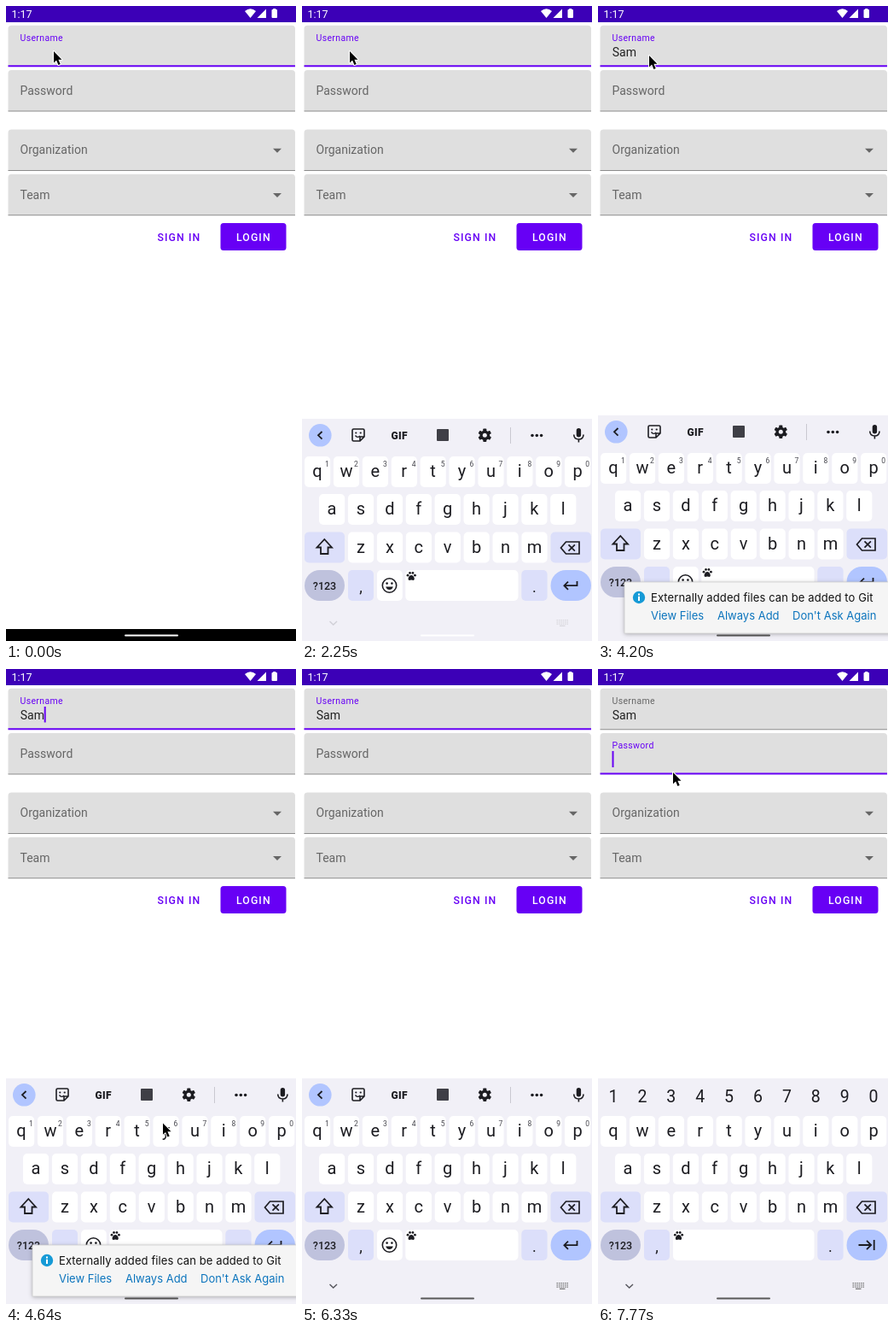
Animation, 340 px wide and 743 px high, one loop 8 s. Source, as an HTML page with a canvas:

```html
<!DOCTYPE html>
<html lang="en">
<head>
<meta charset="utf-8">
<style>
html, body { margin: 0; width: 340px; height: 743px; overflow: hidden; background: #fff; }
canvas { display: block; }
</style>
</head>
<body>
<canvas id="stage" width="340" height="743"></canvas>
<script>
const ctx = document.getElementById('stage').getContext('2d');
const LOOP = 8000;
const ACCENT = '#6700f5', GREY = '#666', INK = '#1c1c21', LINK = '#0b74bd';
const USER = 'Sam';
const LINKS = [['View Files', 62], ['Always Add', 140], ["Don't Ask Again", 228]];

// Times at which each part starts and stops being visible
const CARET_ON = [[480, 990], [1500, 1800], [2600, 3110], [3310, 3820], [4290, 4800],
  [5310, 5820], [6350, 6830], [7340, 7620], [7720, 8000]];
const MOUSE = [[0, 56, 53], [4199, 56, 53], [4200, 60, 58], [4870, 230, 707], [5140, 230, 707],
  [5220, 214, 709], [5820, 341, 703]];
const MOUSE_BACK = [[6830, 227, 643], [7420, 88, 121], [8000, 88, 121]];

const clamp = v => Math.max(0, Math.min(1, v));
const mix = (a, b, p) => a + (b - a) * p;
const within = (t, spans) => spans.some(([a, b]) => t >= a && t < b);

function along(keys, t) {
  for (let i = 1; i < keys.length; i++) {
    const [t0, x0, y0] = keys[i - 1], [t1, x1, y1] = keys[i];
    if (t <= t1) {
      const p = clamp((t - t0) / (t1 - t0)), e = p * p * (3 - 2 * p);
      return [mix(x0, x1, e), mix(y0, y1, e)];
    }
  }
}

function text(str, x, y, size, color, { font = 'Roboto', weight = 400, align = 'left', gap = 0 } = {}) {
  ctx.font = `${weight} ${size}px ${font}, sans-serif`;
  ctx.letterSpacing = gap + 'px';
  ctx.textAlign = align;
  ctx.fillStyle = color;
  ctx.fillText(str, x, y);
  return ctx.measureText(str).width;
}

function box(x, y, w, h, color, r = 0) {
  ctx.fillStyle = color;
  ctx.beginPath();
  ctx.roundRect(x, y, w, h, r);
  ctx.fill();
}

function disc(x, y, r, color) {
  box(x - r, y - r, 2 * r, 2 * r, color, r);
}

function fill(d, color) {
  ctx.fillStyle = color;
  ctx.fill(new Path2D(d));
}

function line(d, color = INK, width = 1.8) {
  ctx.strokeStyle = color;
  ctx.lineWidth = width;
  ctx.stroke(new Path2D(d));
}

function at(x, y, draw) {
  ctx.save();
  ctx.translate(x, y);
  draw();
  ctx.restore();
}

function statusBar() {
  box(0, 0, 340, 19, '#3c00b7');
  text('1:17', 6.5, 13.5, 12.5, '#fff');
  fill('M286.5 14 L280 6 Q286.5 0.5 293 6 Z', '#fff');
  fill('M305 3.5 V14 H294.5 Z', '#fff');
  box(311.5, 4, 6.5, 10, '#fff', 1);
  box(313.2, 3, 3, 2, '#fff');
}

function field(y, label, { focused = false, raised = 0, menu = false } = {}) {
  box(2.5, y, 336.5, 48, '#dfdfdf', [4, 4, 0, 0]);
  if (focused) box(2.5, y + 46.5, 336.5, 2, ACCENT);
  else box(2.5, y + 47.5, 336.5, 1, '#8c8c8c');
  text(label, 16.5, mix(y + 28.8, y + 18.3, raised), mix(14, 10.5, raised),
    focused ? ACCENT : GREY, { gap: 0.35 * raised });
  if (menu) fill(`M313 ${y + 22.2} h10 l-5 5 Z`, GREY);
}

function form(t) {
  const onPassword = t >= 7620;
  field(22.7, 'Username', { focused: !onPassword, raised: 1 });
  field(75, 'Password', { focused: onPassword, raised: clamp((t - 7620) / 150) });
  field(144.5, 'Organization', { menu: true });
  field(196.8, 'Team', { menu: true });

  const typed = USER.slice(0, [2600, 3310, 3450].filter(k => t >= k).length);
  const width = text(typed, 16.7, 58.5, 14, '#222');
  if (within(t, CARET_ON)) {
    if (onPassword) box(16.5, 96, 2, 19, ACCENT);
    else box(16.5 + width, 44, 2, 18.5, ACCENT);
  }

  text('SIGN IN', 177.5, 274.6, 12.25, ACCENT, { weight: 500, gap: 1.1 });
  box(251.5, 254, 77, 32, ACCENT, 3.5);
  text('LOGIN', 270, 274.6, 12.25, '#fff', { weight: 500, gap: 1.1 });
}

function toolbar() {
  disc(21.3, 498.3, 13.3, '#b1c5ff');
  line('M23.5 494 L19 498.3 L23.5 502.6');
  at(66, 498, () => {
    line('M-7 -5.5 Q-7 -7 -5.5 -7 H5.5 Q7 -7 7 -5.5 V2 L2 7 H-5.5 Q-7 7 -7 5.5 Z M7 2 H2 V7', INK, 1.6);
    line('M-3.5 0.5 Q-1 4 2 1', INK, 1.4);
    disc(-2.7, -2.5, 1.1, INK);
    disc(2.7, -2.5, 1.1, INK);
  });
  text('GIF', 104.5, 502.6, 12, INK, { weight: 900, gap: 0.3 });
  box(158, 491, 14, 14, '#3f3f46', 1);
  at(214.3, 498.3, () => {
    for (let i = 0; i < 6; i++) {
      ctx.rotate(Math.PI / 3);
      box(-2, -7.8, 4, 4, INK, 0.8);
    }
    disc(0, 0, 5.8, INK);
    disc(0, 0, 2.5, '#f1f0f7');
  });
  box(244, 489, 1, 19, '#c9c8d0');
  [270, 275.3, 280.6].forEach(x => disc(x, 498.5, 1.8, INK));
  box(321.7, 490, 5.4, 10.5, INK, 2.7);
  line('M318.7 497.5 Q319 503 324.4 503 Q329.8 503 330 497.5 M324.4 503 V506.5', INK, 1.6);
}

function paw(x, y) {
  at(x, y, () => {
    fill('M0 -1 C3 -1 5 4 2.5 5 Q0 4 -2.5 5 C-5 4 -3 -1 0 -1 Z', INK);
    [[-4.2, -0.8], [-1.7, -3.6], [1.7, -3.6], [4.2, -0.8]].forEach(([px, py]) => disc(px, py, 1.4, INK));
  });
}

function key(x, y, w, color = '#fff', r = 5) {
  box(x, y, w, 36, color, r);
}

function keyRow(chars, center, y, hints) {
  [...chars].forEach((c, i) => {
    const x = center + 33.9 * i;
    key(x - 15, y, 30.2);
    text(c, x, y + 24.3, 20, INK, { align: 'center' });
    if (hints) text(String((i + 1) % 10), x + 11.5, y + 11.5, 8.5, '#45454d', { align: 'center' });
  });
}

function keyboard(t) {
  const secret = t >= 7690;
  box(0, 479, 340, 270, '#f1f0f7');
  if (secret) {
    for (let i = 0; i < 10; i++) {
      text(String((i + 1) % 10), 18 + 33.9 * i, 507, 19.5, INK, { align: 'center' });
    }
  } else toolbar();

  keyRow('qwertyuiop', 18, 523, !secret);
  keyRow('asdfghjkl', 35, 567);
  keyRow('zxcvbnm', 69, 611.5);

  key(3, 611.5, 47, '#dcdffa');
  line('M26.3 620 L35 629.5 H30.5 V637 H22 V629.5 H17.5 Z');
  key(291.5, 611.5, 47.5, '#dcdffa');
  line('M303.5 630 L309.5 623 H325 V637 H309.5 Z M312.5 626.3 l7.4 7.4 M319.9 626.3 l-7.4 7.4', INK, 1.7);

  key(3, 656, 47, '#bfc2dd', 18);
  text('?123', 26.5, 679, 12.5, INK, { weight: 500, align: 'center' });
  key(54, 656, 30, '#dcdffa');
  text(',', 69, 682, 18, INK, { align: 'center' });
  key(257.3, 656, 30.3, '#dcdffa');
  text('.', 272.3, 682, 18, INK, { align: 'center' });
  key(291.5, 656, 47.5, '#b1c5ff', 18);

  if (secret) {
    key(88, 656, 165.5);
    paw(94.5, 663);
    line('M305.5 674 H320 M315 668.8 L320.2 674 L315 679.2 M323.7 668 V680');
  } else {
    key(88, 656, 29.8);
    key(121.3, 656, 132.2);
    paw(128.2, 663);
    at(102.5, 674, () => {
      line('M8.2 0 A8.2 8.2 0 1 1 -8.2 0 A8.2 8.2 0 1 1 8.2 0', INK, 1.6);
      disc(-2.9, -2.4, 1.3, INK);
      disc(2.9, -2.4, 1.3, INK);
      fill('M-4.4 1.5 H4.4 Q3 5 0 5 Q-3 5 -4.4 1.5 Z', INK);
    });
    line('M322.5 669 V674.2 H307.5 M312 669.6 L307.4 674.2 L312 678.8');
  }
}

function navigation(t) {
  if (t < 2100) {
    box(0, 729, 340, 14, '#000');
    box(139, 735.5, 63, 2, '#fff', 1);
    return;
  }
  ctx.globalAlpha = t < 2250 ? 0 : clamp(0.2 + (t - 2250) / 220);
  line('M32.5 720 L36.7 724 L41 720', '#55555c', 1.4);
  for (let r = 0; r < 3; r++) {
    for (let c = 0; c < 6; c++) box(298.5 + c * 2.4, 718 + r * 2.2, 1.5, 1.3, '#777');
  }
  box(302, 724.6, 6.5, 1.3, '#777');
  ctx.globalAlpha = 1;
  const shade = t < 2270 ? 255 : t < 3110 ? mix(255, 160, clamp((t - 2270) / 380)) : t < 3820 ? 112 : 88;
  box(139, 735.5, 63, 2, `rgb(${shade},${shade},${shade})`, 1);
}

function notice(mx, my) {
  ctx.save();
  ctx.shadowColor = 'rgba(0,0,0,.3)';
  ctx.shadowBlur = 5;
  ctx.shadowOffsetY = 1;
  box(31, 674, 330, 60, '#f5f5f5');
  ctx.restore();
  line('M31 674 H345 M31 674 V734 H345', '#cfcfcf', 0.8);
  disc(48, 692, 7.2, '#169ad6');
  box(47, 690.8, 2, 5.2, '#fff');
  box(47, 687.4, 2, 2, '#fff');
  const font = { font: 'Inter', gap: 0.1 };
  text('Externally added files can be added to Git', 62, 696.7, 13, '#111', font);
  LINKS.forEach(([label, x]) => {
    const w = text(label, x, 717.8, 13, LINK, { font: 'Inter' });
    if (mx >= x && mx <= x + w && my > 704 && my < 722) box(x, 719.5, w, 1, LINK);
  });
}

function pointer(x, y, hand) {
  at(x, y, () => {
    ctx.lineJoin = 'round';
    if (hand) {
      const d = 'M-1.7 1.5 Q-1.7 0 0 0 Q1.5 0 1.7 1.5 L2.2 6 Q4 5 5 6.7 Q7 6 7.7 7.7 Q9.8 7.3 9.8 9.5 ' +
        'Q10 13 8.3 16.5 H0.5 Q-1.5 13.5 -4.5 10.8 Q-5.6 9 -3.5 8.6 L-1 10 Z';
      fill(d, '#fff');
      line(d, '#000', 1.2);
      line('M2.5 10.5 v3.5 M4.7 10.5 v3.5 M6.9 10.5 v3.5', '#000', 0.8);
    } else {
      const d = 'M0 0 V13.4 L3.1 10.6 L5.4 16 L7.7 15 L5.4 9.8 H9.5 Z';
      line(d, '#fff', 2);
      fill(d, '#000');
    }
  });
}

function render(t) {
  box(0, 0, 340, 743, '#fff');
  statusBar();
  form(t);
  if (t >= 2100) {
    at(0, t < 2250 ? 205 : t < 2270 ? 4 : 0, () => keyboard(t));
  }
  navigation(t);

  const mouse = t <= 5820 ? along(MOUSE, t) : t >= 6830 ? along(MOUSE_BACK, t) : null;
  const noticed = t >= 2850 && t < 6330;
  const [mx, my] = mouse || [-99, -99];
  if (noticed) notice(mx, my);
  if (mouse) pointer(mx, my, noticed && my > 704 && mx < 328);
}

function tick(now) {
  render(now % LOOP);
  requestAnimationFrame(tick);
}
requestAnimationFrame(tick);
</script>
</body>
</html>
```
